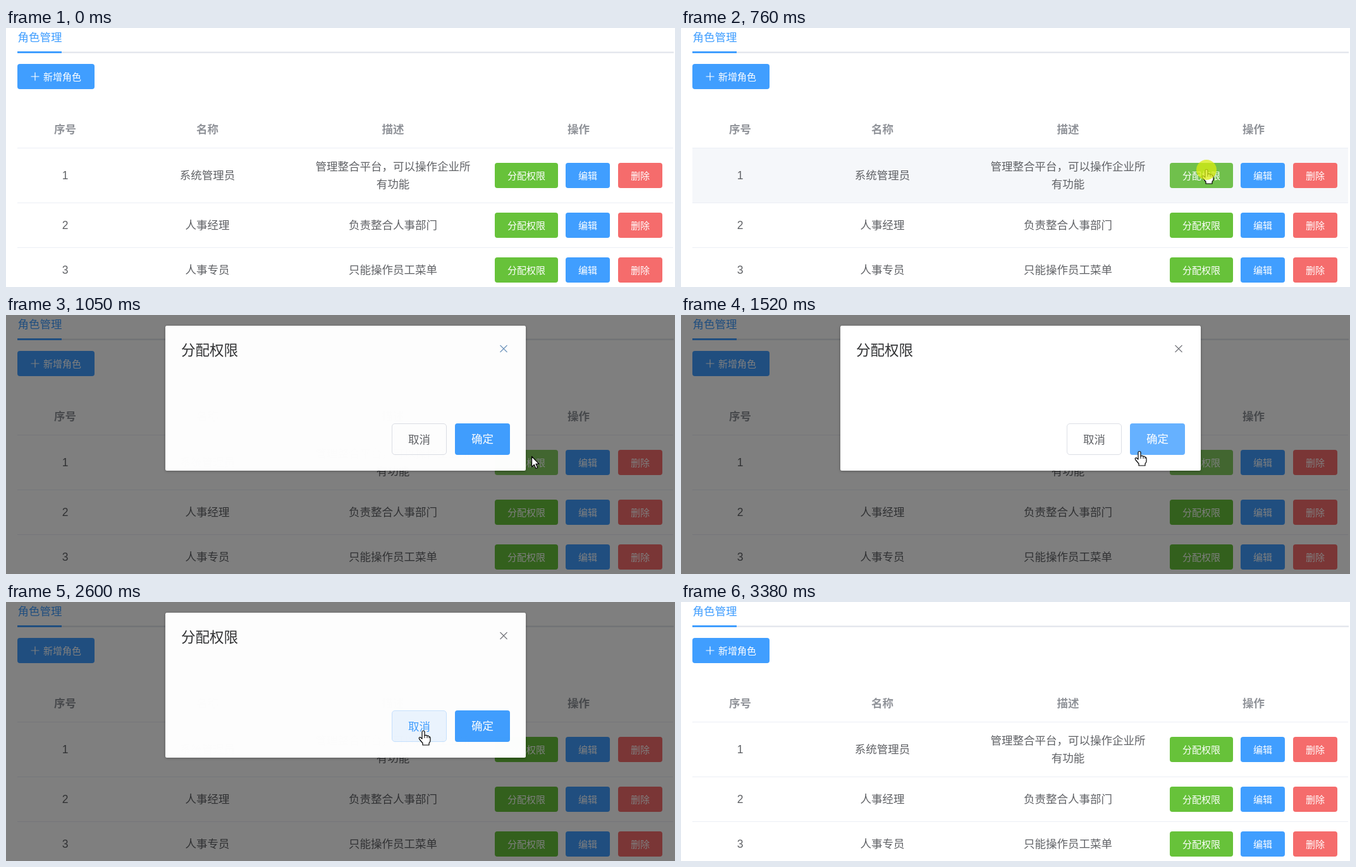
These frames come from a looping animation (1058 by 411 pixels, 4090 ms). An HTML page:

```html
<!DOCTYPE html>
<html lang="zh-CN">
<head>
<meta charset="utf-8">
<title>角色管理</title>
<style>
html, body { margin: 0; width: 100%; height: 100%; overflow: hidden; background: #fff; }
svg { display: block; }
text { font-family: "Liberation Sans", "Noto Sans CJK SC", "Noto Sans CJK", sans-serif; }
</style>
</head>
<body>
<svg id="stage" width="1058" height="411" viewBox="0 0 1058 411"></svg>
<script>
const stage = document.getElementById('stage');
const LOOP = 4090;
const BLUE = '#409eff', GREEN = '#67c23a', RED = '#f56c6c', GREY = '#606266', HEAD = '#909399';

// Row: top edge, height, centre line, name, description lines
const rows = [
  [191, 86, 234, '系统管理员', ['管理整合平台，可以操作企业所', '有功能']],
  [278, 70, 313, '人事经理', ['负责整合人事部门']],
  [349, 62, 384, '人事专员', ['只能操作员工菜单']]
];

// Start time, cursor, x, y, hovered row, highlighted control, dialog opacity, dialog shift, mask opacity, click ring
const steps = [
  [0],
  [100, 'hand', 890, 385, 3, 'edit3'],
  [260, 'arrow', 862, 275, 2],
  [410, 'hand', 845, 241, 1, 'grant1'],
  [590, 'hand', 831, 224, 1, 'grant1'],
  [760, 'hand', 831, 224, 1, 'press1', 0, 0, 0, 1],
  [890, 'arrow', 831, 224, 0, 'grant1', .69, -8, .44],
  [1050, 'arrow', 831, 224, 0, 'grant1 close', .99, 0, .5],
  [1200, 'arrow', 831, 224, 0, 'grant1', 1, 0, .5],
  [1380, 'arrow', 755, 222, 0, 'grant1', 1, 0, .5],
  [1520, 'hand', 725, 216, 0, 'grant1 ok', 1, 0, .5],
  [1670, 'hand', 687, 210, 0, 'grant1 cancel', 1, 0, .5],
  [1830, 'hand', 665, 206, 0, 'grant1 cancel', 1, 0, .5],
  [2000, 'hand', 660, 204, 0, 'grant1 cancel', 1, 0, .5],
  [2460, 'hand', 660, 204, 0, 'cancel', 1, 0, .5, 1],
  [2600, 'hand', 660, 204, 0, 'cancel', .99, 0, .5],
  [2770, 'hand', 660, 204, 0, 'cancel', .18, -20, .02],
  [2920, 'arrow', 660, 204],
  [3070, 'arrow', 652, 244, 1],
  [3230, 'arrow', 640, 392, 3],
  [3380]
];

const cursors = {
  arrow: '<path d="M.5 .5V17L4.3 13.4 7 19.5 9.7 18.3 7 12.4H12Z"/>',
  hand: '<path d="M-2 2Q-2 .5 0 .5T2 2V8Q4.500 6.500 6 8.500 8 7.500 9 9.500 11 9.500 11 12V16Q11 18 9 20V23H-1V20L-6 14Q-8 11 -5 10.500L-2 13Z"/>' +
    '<path d="M2 8V12M6 9V12M9 10V12" fill="none" stroke-width="1"/>'
};

const rect = (x, y, w, h, fill, more = '') =>
  `<rect x="${x}" y="${y}" width="${w}" height="${h}" fill="${fill}" ${more}/>`;

// Text is centred vertically on y.
const text = (x, y, str, fill, size = 17.5, anchor = 'middle', weight = 400) =>
  `<text x="${x}" y="${y + size * .37}" fill="${fill}" font-size="${size}" text-anchor="${anchor}" font-weight="${weight}">${str}</text>`;

const button = (x, y, w, h, fill, label, size = 15) =>
  rect(x, y, w, h, fill, 'rx="4"') + text(x + w / 2, y + h / 2, label, '#fff', size);

const strokes = (d, color, width) =>
  `<path d="${d}" stroke="${color}" stroke-width="${width}" fill="none"/>`;

function tableRow([top, height, mid, name, lines], i, hovered, lit) {
  const n = i + 1;
  const grant = lit.includes('press' + n) ? '#70c04c' : lit.includes('grant' + n) ? '#85ce61' : GREEN;
  const edit = lit.includes('edit' + n) ? '#66b1ff' : BLUE;
  return (hovered === n ? rect(18, top, 1037, height, '#f5f7fa') : '') +
    rect(18, top - 1, 1037, 1, '#ebeef5') +
    text(93.5, mid, n, GREY) +
    text(318.5, mid, name, GREY) +
    lines.map((line, k) => text(612, mid + (k - (lines.length - 1) / 2) * 28, line, GREY)).join('') +
    button(773, mid - 20, 100, 40, grant, '分配权限') +
    button(885, mid - 20, 70, 40, edit, '编辑') +
    button(968, mid - 20, 70, 40, RED, '删除');
}

function page(hovered, lit) {
  const heads = [[93.5, '序号'], [318.5, '名称'], [612, '描述'], [905.5, '操作']];
  return rect(0, 0, 1058, 411, '#fff') +
    text(18.5, 14.5, '角色管理', BLUE, 17.5, 'start') +
    rect(18, 37.5, 1038, 2.5, '#e4e7ed') +
    rect(18, 37, 70, 3, BLUE) +
    rect(18, 57, 122, 40, BLUE, 'rx="4"') +
    strokes('M39.500 77H52.500M46 70.500V83.500', '#fff', 1.2) +
    text(59, 77, '新增角色', '#fff', 15, 'start') +
    heads.map(([x, label]) => text(x, 161, label, HEAD, 17.5, 'middle', 700)).join('') +
    rows.map((row, i) => tableRow(row, i, hovered, lit)).join('');
}

function dialog(opacity, shift, lit) {
  const over = lit.includes('cancel');
  return `<g opacity="${opacity}" transform="translate(0 ${shift})">` +
    rect(252, 17, 570, 230, '#fff', 'rx="2.5" style="filter:drop-shadow(0 1px 2px rgba(0,0,0,.3))"') +
    text(277, 56, '分配权限', '#303133', 22.5, 'start') +
    strokes('M781.500 48L792.500 59M792.500 48L781.500 59', lit.includes('close') ? '#7096bd' : '#75777c', 1.2) +
    rect(610.5, 172.5, 86, 49, over ? '#ecf5ff' : '#fff', `rx="4.5" stroke="${over ? '#c6e2ff' : '#dcdfe6'}"`) +
    text(653.5, 197.5, '取消', over ? BLUE : GREY) +
    button(710, 172, 87, 50, lit.includes('ok') ? '#66b1ff' : BLUE, '确定', 17.5) +
    '</g>';
}

function scene([, cursor, x, y, hovered = 0, lit = '', opacity = 0, shift = 0, mask = 0, ring = 0]) {
  let out = page(hovered, lit);
  if (opacity) out += rect(0, 0, 1058, 411, '#000', `opacity="${mask}"`) + dialog(opacity, shift, lit);
  if (cursor) out += `<g transform="translate(${x} ${y})" fill="#fff" stroke="#000" stroke-width="1.2" stroke-linejoin="round">${cursors[cursor]}</g>`;
  if (ring) out += `<circle cx="${x}" cy="${y + 1}" r="16" fill="#d8ec10" opacity=".75"/>`;
  return out;
}

let shown;
function tick() {
  const t = performance.now() % LOOP;
  const step = steps.findLast(s => s[0] <= t);
  if (step !== shown) stage.innerHTML = scene(shown = step);
  requestAnimationFrame(tick);
}
tick();
</script>
</body>
</html>
```
